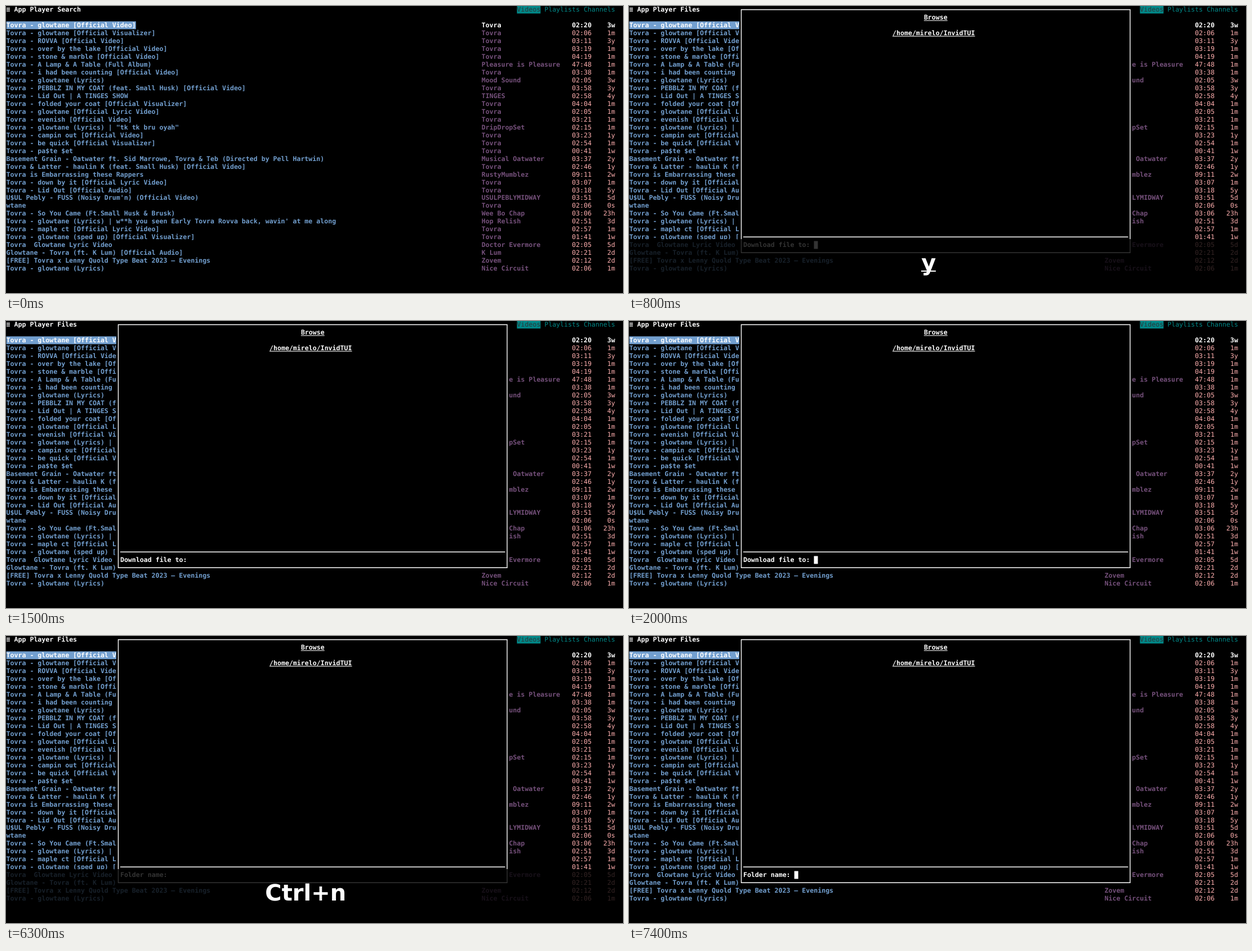
An HTML page that plays this animation: 1096x511 px, repeating every 8 s.

```html
<!DOCTYPE html>
<html lang="en">
<head>
<meta charset="utf-8">
<title>Terminal video player</title>
<style>
html, body { margin: 0; width: 100%; height: 100%; overflow: hidden; background: #000; }
svg { display: block; }
text {
  font: 11.59px "DejaVu Sans Mono", monospace;
  white-space: pre;
  text-rendering: geometricPrecision;
}
.b { font-weight: bold; }
#key { font: bold 40px "DejaVu Sans", sans-serif; text-anchor: middle; }
</style>
</head>
<body>
<svg id="stage" width="1096" height="511" viewBox="0 0 1096 511"></svg>
<script>
const CW = 6.977, CH = 13.97, LOOP = 8000;
const BLUE = '#729fcf', PURPLE = '#75507b', PINK = '#ffafaf', TEAL = '#008787', WHITE = '#fff';
const ARTIST = 'Tovra';
const colX = c => 0.6 + c * CW;
const rowY = r => -0.6 + r * CH;
const stage = document.getElementById('stage');

// title | channel (default: ARTIST) | duration | age
const videos = `Tovra - glowtane [Official Video]||02:20|3w
Tovra - glowtane [Official Visualizer]||02:06|1m
Tovra - ROVVA [Official Video]||03:11|3y
Tovra - over by the lake [Official Video]||03:19|1m
Tovra - stone & marble [Official Video]||04:19|1m
Tovra - A Lamp & A Table (Full Album)|Pleasure is Pleasure|47:48|1m
Tovra - i had been counting [Official Video]||03:38|1m
Tovra - glowtane (Lyrics)|Mood Sound|02:05|3w
Tovra - PEBBLZ IN MY COAT (feat. Small Husk) [Official Video]||03:58|3y
Tovra - Lid Out ¦ A TINGES SHOW|TINGES|02:58|4y
Tovra - folded your coat [Official Visualizer]||04:04|1m
Tovra - glowtane [Official Lyric Video]||02:05|1m
Tovra - evenish [Official Video]||03:21|1m
Tovra - glowtane (Lyrics) ¦ "tk tk bru oyah"|DripDropSet|02:15|1m
Tovra - campin out [Official Video]||03:23|1y
Tovra - be quick [Official Visualizer]||02:54|1m
Tovra - pa$te $et||00:41|1w
Basement Grain - Oatwater ft. Sid Marrowe, Tovra & Teb (Directed by Pell Hartwin)|Musical Oatwater|03:37|2y
Tovra & Latter - haulin K (feat. Small Husk) [Official Video]||02:46|1y
Tovra is Embarrassing these Rappers|RustyMumblez|09:11|2w
Tovra - down by it [Official Lyric Video]||03:07|1m
Tovra - Lid Out [Official Audio]||03:18|5y
U$UL Pebly - FUSS (Noisy Drum'n) (Official Video)|USULPEBLYMIDWAY|03:51|5d
wtane||02:06|0s
Tovra - So You Came (Ft.Small Husk & Brusk)|Wee Bo Chap|03:06|23h
Tovra - glowtane (Lyrics) ¦ w**h you seen Early Tovra Rovva back, wavin' at me along|Hop Relish|02:51|3d
Tovra - maple ct [Official Lyric Video]||02:57|1m
Tovra - glowtane (sped up) [Official Visualizer]||01:41|1w
Tovra  Glowtane Lyric Video|Doctor Evermore|02:05|5d
Glowtane - Tovra (ft. K Lum) [Official Audio]|K Lum|02:21|2d
[FREE] Tovra x Lenny Quold Type Beat 2023 – Evenings|Zovem|02:12|2d
Tovra - glowtane (Lyrics)|Nice Circuit|02:06|1m`;

function add(tag, attrs, parent = stage) {
  const el = document.createElementNS('http://www.w3.org/2000/svg', tag);
  for (const k in attrs) el.setAttribute(k, attrs[k]);
  return parent.appendChild(el);
}

function rect(x, y, width, height, fill, parent) {
  return add('rect', { x, y, width, height, fill }, parent);
}

function cells(col, row, cols, rows, fill, parent) {
  return rect(colX(col), rowY(row), cols * CW, rows * CH, fill, parent);
}

function print(col, row, str, fill, bold, parent) {
  const el = add('text', { x: colX(col), y: rowY(row) + 10.8, fill, class: bold ? 'b' : '' }, parent);
  el.textContent = str;
  return el;
}

function underlined(col, row, str, parent) {
  print(col, row, str, WHITE, true, parent);
  rect(colX(col), rowY(row) + 12, str.length * CW, 1.1, WHITE, parent);
}

// Header
print(0, 0, '≡', WHITE, true);
const header = print(2, 0, '', WHITE, true);
cells(130, 0, 6, 1, TEAL);
print(130, 0, 'Videos', '#2e3436');
print(137, 0, 'Playlists Channels', TEAL);

// Search results
videos.split('\n').forEach((line, i) => {
  const [title, channel, duration, age] = line.split('|');
  const row = i + 2, current = i === 0;
  if (current) cells(0, row, title.length, 1, BLUE);
  print(0, row, title.replace('¦', '|'), current ? WHITE : BLUE, true);
  print(121, row, channel || ARTIST, current ? WHITE : PURPLE, true);
  print(144, row, duration, current ? WHITE : PINK, current);
  print(155 - age.length, row, age, current ? WHITE : PINK, current);
});

// File browser
const popup = add('g', {});
cells(28, 0, 100, 32, '#000', popup);
add('path', {
  d: `M${colX(28.5)} 6.5H${colX(127.5)}V439.3H${colX(28.5)}ZM${colX(29)} 411.3H${colX(127)}`,
  fill: 'none', stroke: WHITE, 'stroke-width': 1.4
}, popup);
underlined(75, 1, 'Browse', popup);
underlined(67, 3, '/home/mirelo/InvidTUI', popup);
const prompt = print(29, 30, '', WHITE, true, popup);
const cursor = cells(0, 30, 1, 1, WHITE, popup);

// Pressed key display
const keys = add('g', {});
rect(0, 415, 1096, 96, 'rgba(0,0,0,.8)', keys);
const key = add('text', { id: 'key', x: 532.3, y: 471, fill: WHITE }, keys);
const recent = rect(519, 471, 26, 2, WHITE, keys);

const show = (el, on) => el.setAttribute('visibility', on ? 'inherit' : 'hidden');
const within = (t, a, b) => t >= a && t < b;

function draw(t) {
  const open = t >= 800, naming = t >= 6300;
  const label = naming ? 'Folder name: ' : 'Download file to: ';
  header.textContent = 'App Player ' + (open ? 'Files' : 'Search');
  show(popup, open);
  prompt.textContent = label;
  cursor.setAttribute('x', colX(29 + label.length));
  show(cursor, within(t, 800, 1400) || within(t, 2000, 2600) || t >= 7400);
  show(keys, within(t, 700, 1500) || within(t, 6300, 6500));
  key.textContent = naming ? 'Ctrl+n' : 'y';
  show(recent, within(t, 700, 900));
  if (!open) show(cursor, false);
}

const start = performance.now();
function tick() {
  draw((performance.now() - start) % LOOP);
  requestAnimationFrame(tick);
}
tick();
</script>
</body>
</html>
```
